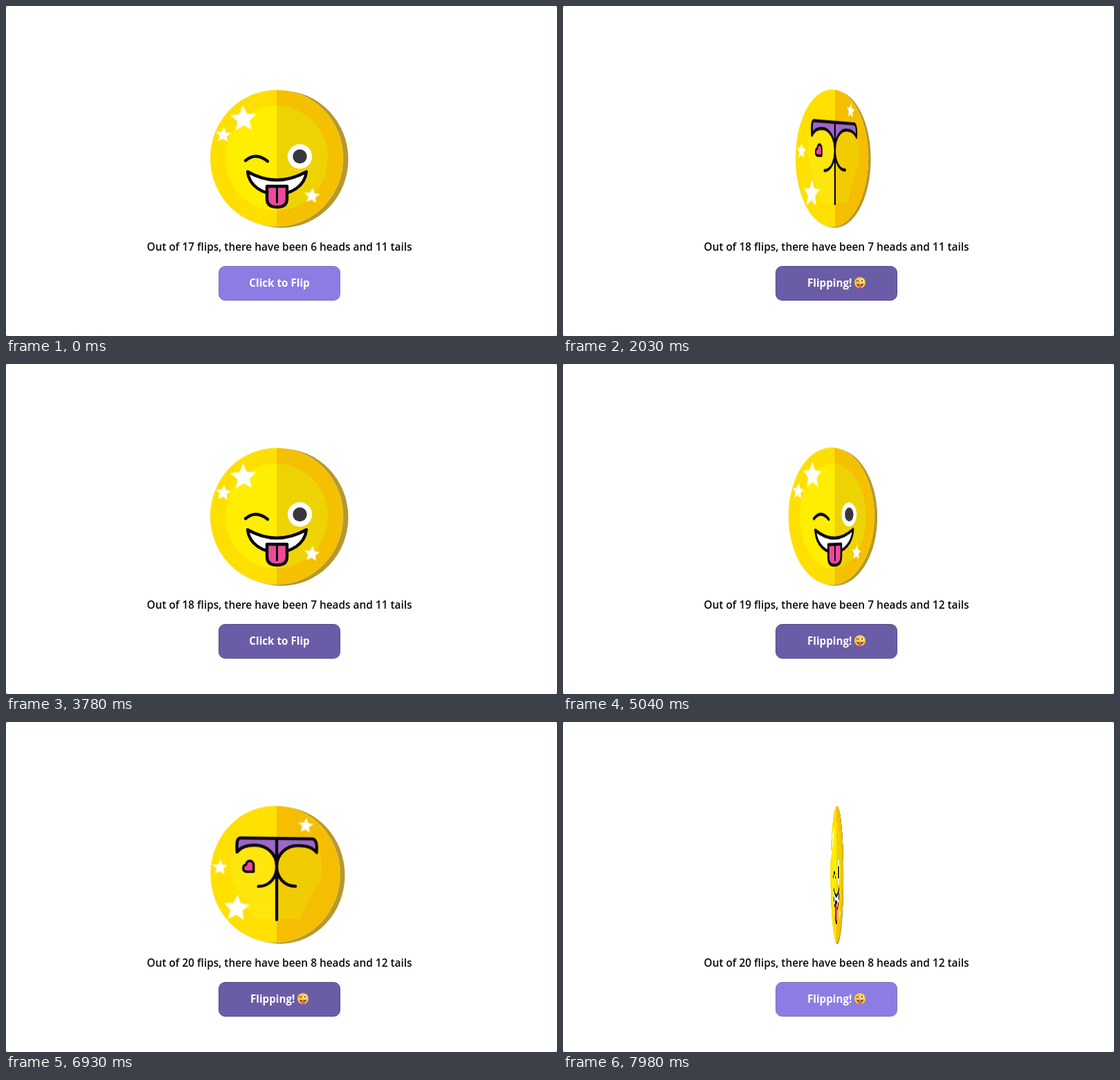
An HTML page for the animation above (8 s loop, 796 px wide and 476 px high).

```html
<!DOCTYPE html>
<html lang="en">
<head>
<meta charset="utf-8">
<title>Coin flip</title>
<style>
  html, body { margin: 0; width: 100%; height: 100%; overflow: hidden; background: #a8a8a8; }
  #stage { position: absolute; width: 796px; height: 476px; border-radius: 3px; overflow: hidden; background: #fff; }
  #panel { position: absolute; left: 0; top: 0; }
  #view { position: absolute; left: 295px; top: 120px; width: 200px; height: 200px; perspective: 1000px; }
  #coin { width: 200px; height: 200px; transform-style: preserve-3d; }
  #coin svg { position: absolute; overflow: visible; backface-visibility: hidden; }
  #coin svg:last-child { transform: rotateY(180deg); }
  text { font-family: "Open Sans", "Noto Sans", sans-serif; }
  #tally { font-size: 15.4px; font-weight: 600; text-anchor: middle; fill: #0a0a0a; }
  .label { font-size: 15.2px; font-weight: 700; fill: #fff; }
  .ink { stroke: #0b0710; stroke-width: 4.4; stroke-linecap: round; stroke-linejoin: round; fill: none; }
  .star { fill: #fff; stroke: #fff; stroke-opacity: .35; stroke-width: 2.5; stroke-linejoin: round; }
</style>
</head>
<body>
<div id="stage">
  <svg id="panel" width="796" height="476">
    <defs id="defs"></defs>
    <text id="tally" x="395" y="353"></text>
    <rect id="button" x="307.5" y="375.5" width="175" height="49" rx="9"/>
    <text id="idle" class="label" x="395" y="405" text-anchor="middle">Click to Flip</text>
    <g id="busy">
      <text class="label" x="353" y="405">Flipping!</text>
      <g transform="translate(429 399)">
        <circle r="8" fill="#fcc93b"/>
        <circle cx="3" cy="-2.5" r="2.6" fill="#fff"/>
        <circle cx="3" cy="-2.5" r="1.2" fill="#4b3420"/>
        <path d="M-5.5 -1.5Q-3.5 -4 -1.5 -1.5" fill="none" stroke="#6b4318" stroke-width="1.2"/>
        <path d="M-5 1.5Q0 3.5 5 1.5Q4 6 0 6Q-4 6 -5 1.5Z" fill="#6b3a1c"/>
        <path d="M-2.5 3H2.5V5.5A2.5 2.5 0 0 1 -2.5 5.5Z" fill="#f0508c"/>
      </g>
    </g>
  </svg>
  <div id="view"><div id="coin"></div></div>
</div>
<script>
const el = id => document.getElementById(id);
const LOOP = 8000, HOVER_START = 450, HOVER_END = 7800;

// Each flip: start time, duration, resting angle before it, degrees turned, tally text.
const flips = [
  { start: 1339, span: 2100, from: 0, turn: 720, heads: 7, tails: 11 },
  { start: 4091, span: 2084, from: 0, turn: 900, heads: 7, tails: 12 },
  { start: 6899, span: 2138, from: 180, turn: 900, heads: 8, tails: 12 }
];
const before = { start: -1, span: 1, from: 0, turn: 0, heads: 6, tails: 11 };

const halves = (id, left, right) => `<linearGradient id="${id}">
  <stop offset=".5" stop-color="${left}"/><stop offset=".5" stop-color="${right}"/></linearGradient>`;

el('defs').innerHTML =
  halves('headRim', '#ffdf00', '#f4c000') + halves('headDisc', '#ffee00', '#eed304') +
  halves('tailDisc', '#ffe000', '#f5be02') + halves('body', '#ffe60c', '#f2cc02');

function star(x, y, radius, tilt) {
  let points = '';
  for (let i = 0; i < 10; i++) {
    const r = i % 2 ? radius * 0.47 : radius;
    const a = (i * 36 - 90 + tilt) * Math.PI / 180;
    points += `${(x + r * Math.cos(a)).toFixed(2)},${(y + r * Math.sin(a)).toFixed(2)} `;
  }
  return `<polygon class="star" points="${points}"/>`;
}

const face = (fill, art) => `<svg width="200" height="200" viewBox="-100 -100 200 200">
  <ellipse cx="3" cy="1" rx="96.5" ry="99" fill="#b8982a"/>
  <ellipse cx="-4" cy="-.5" rx="96" ry="98.5" fill="url(#${fill})" stroke="#eee5b8" stroke-opacity=".4"/>
  ${art}</svg>`;

const headArt = `
  <ellipse cx="-4" cy="-.5" rx="74" ry="75.5" fill="url(#headDisc)"/>
  ${star(-52, -57, 18.5, -2)}${star(-81, -34, 10.5, 5)}${star(47, 54, 10.5, 6)}
  <path class="ink" d="M-49 3Q-34 -10 -17 4"/>
  <circle cx="29.5" cy="-3" r="17.7" fill="#fff"/>
  <circle cx="29.5" cy="-3" r="10.2" fill="#39373c"/>
  <path class="ink" style="fill:#fff" d="M-46 19Q-4 43 39 19C34 62 -41 62 -46 19Z"/>
  <path class="ink" style="fill:#ed4a9a" d="M-18 40H11V58Q11 70 -3.5 70Q-18 70 -18 58Z"/>
  <path class="ink" style="stroke-width:3" d="M-3.5 42V63"/>`;

const tailArt = `
  <path fill="url(#body)" d="M-62 -48H54Q65 -30 64 -10Q64 10 54 18L30 64H-38L-62 18Q-72 10 -72 -10Q-73 -30 -62 -48Z"/>
  ${star(-62.5, 48, 18.5, 4)}${star(-86.5, -10, 10, 3)}${star(39.5, -71, 10.5, 5)}
  <path class="ink" style="fill:#9b68c4" d="M-62 -32C-63 -45 -62 -52 -57 -52H49C55 -52 57 -45 56 -32C50 -40 37 -42 28 -42C10 -42 -4 -29 -4 -12C-4 -29 -18 -42 -36 -42C-45 -42 -56 -40 -62 -32Z"/>
  <path class="ink" d="M-4 -52V65M-4 -12C-4 5 -15 17 -31 17M-4 -12C-4 5 8 17 24 17"/>
  <path class="ink" style="fill:#ee4799;stroke-width:3.4" d="M-38 -4V-14A5.5 5.5 0 0 0 -49 -14A5.1 5.1 0 0 0 -49 -4Z"/>`;

el('coin').innerHTML = face('headRim', headArt) + face('tailDisc', tailArt);

function draw(now) {
  const t = now % LOOP;
  const flip = flips.findLast(f => t >= f.start) || before;
  const progress = Math.min(1, (t - flip.start) / flip.span);
  const flipping = flip !== before && progress < 1;
  const angle = flip.from + flip.turn * progress;
  const hover = t >= HOVER_START && t < HOVER_END;

  el('coin').style.transform = `rotateY(${angle}deg)`;
  el('tally').textContent = `Out of ${flip.heads + flip.tails} flips, there have been ` +
    `${flip.heads} heads and ${flip.tails} tails`;
  el('button').setAttribute('fill', hover ? '#6b5ca7' : '#8d7ce3');
  el('button').setAttribute('stroke', hover ? '#584c88' : '#8079a8');
  el('idle').style.display = flipping ? 'none' : '';
  el('busy').style.display = flipping ? '' : 'none';
}

function tick() {
  draw(performance.now());
  requestAnimationFrame(tick);
}
tick();
</script>
</body>
</html>
```
